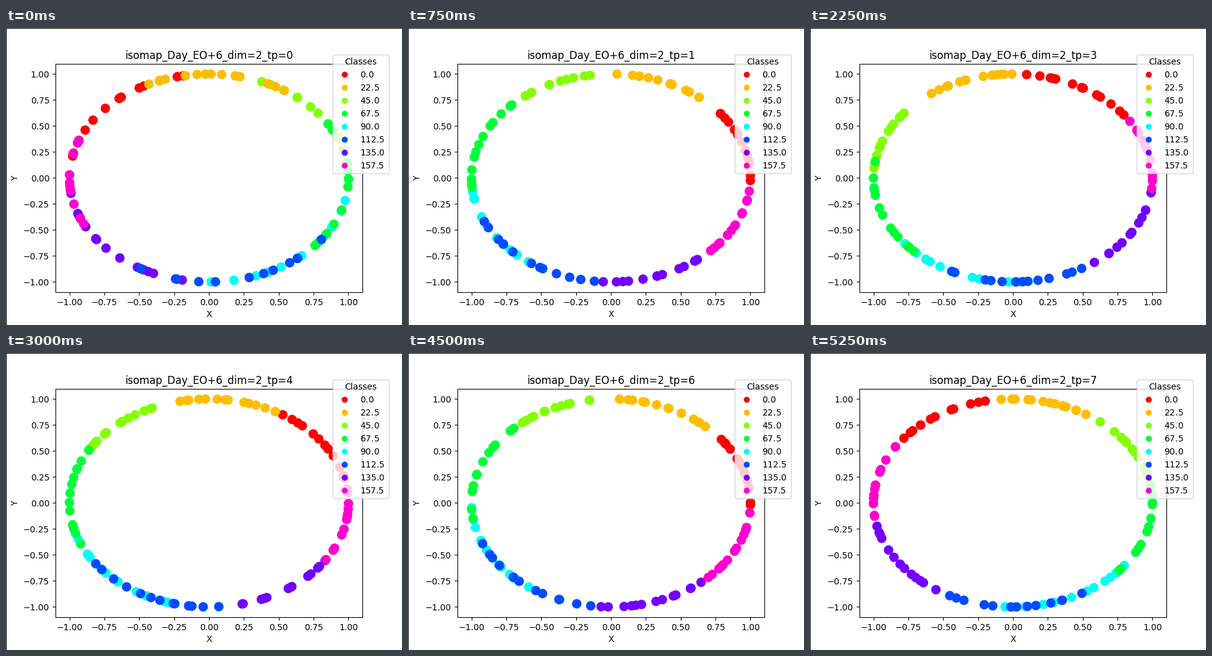
A matplotlib script for the animation above (6000 ms loop, 640 by 480 pixels).

```python
import numpy as np
import matplotlib.pyplot as plt
from matplotlib.animation import FuncAnimation
from matplotlib.patches import Rectangle

W, H, DPI = 640, 480, 100
CLASSES = np.arange(8) * 22.5
# where each class sits round the ring, and half the arc it covers (degrees)
CENTRES = np.array([0, 47, 96, 140, 188, 212, 269, 312])
REACH = np.array([22, 19, 18, 26, 28, 28, 22, 18])
ORDER = [4, 0, 2, 3, 1, 6, 5, 7]  # classes from back to front
PER_CLASS = 13

# per time point: angle of the first class, turning sense, looseness
STEPS = [(134, -1, 1.5), (21, 1, 1), (15, -1, 1), (61, 1, 1),
         (36, 1, 1), (11, 1, 1), (20, 1, 1), (123, -1, 1)]


def ring(i):
    """Points on the unit circle and their class values at time point i."""
    start, sense, loose = STEPS[i]
    rng = np.random.default_rng(i)
    along = np.linspace(-1, 1, PER_CLASS) * REACH[ORDER, None]
    along += rng.normal(0, 2.5, along.shape)
    angle = start + sense * (CENTRES[ORDER, None] + loose * along)
    rad = np.radians(angle.ravel())
    return (np.column_stack([np.cos(rad), np.sin(rad)]),
            np.repeat(CLASSES[ORDER], PER_CLASS))


fig, ax = plt.subplots(figsize=(W / DPI, H / DPI), dpi=DPI)
points, values = ring(0)
dots = ax.scatter(*points.T, c=values, s=100, cmap="hsv", vmin=0, vmax=180)
ax.set(xlim=(-1.1, 1.1), ylim=(-1.1, 1.1), xlabel="X", ylabel="Y")
title = ax.set_title("")
ax.legend(*dots.legend_elements(), title="Classes", loc="lower right",
          bbox_to_anchor=(1.1, 0.5))

# thin black edge along the top and left
for x, y, w, h in [(0, H - 1, W, 1), (0, 0, 1, H)]:
    fig.add_artist(Rectangle((x, y), w, h, color="black", lw=0,
                             transform=None, antialiased=False))


def update(i):
    points, values = ring(i)
    dots.set_offsets(points)
    dots.set_array(values)
    title.set_text(f"isomap_Day_EO+6_dim=2_tp={i}")
    return dots, title


anim = FuncAnimation(fig, update, frames=len(STEPS), interval=750,
                     repeat=True, repeat_delay=0)
plt.show()
```
